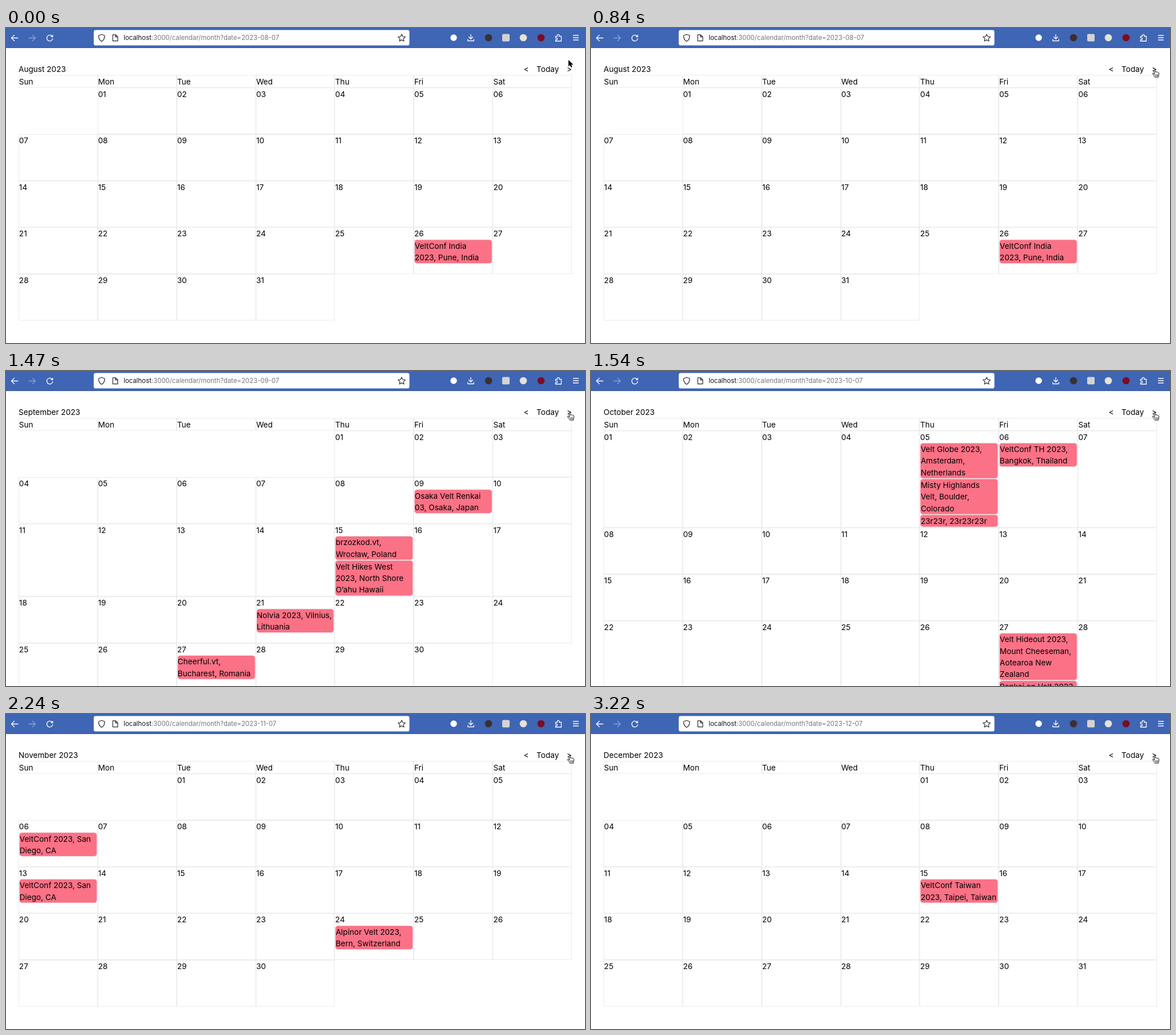
Animation, 1014 px wide and 552 px high, one loop 3570 ms. Source, as an HTML page:

```html
<!DOCTYPE html>
<html lang="en">
<head>
<meta charset="utf-8">
<title>Calendar</title>
<style>
  * { box-sizing: border-box; margin: 0; }
  html, body { width: 100%; height: 100%; overflow: hidden; background: #fff; }
  body { font-family: Inter, sans-serif; color: #000; }
  .stage { position: absolute; left: 0; top: 0; width: 1014px; height: 552px; overflow: hidden; }
  .bar, .overlay { position: absolute; left: 0; top: 0; overflow: visible; }

  .strip { position: absolute; left: 0; top: 0; width: 1014px; height: 552px; display: flex;
    animation: pages 3570ms step-end infinite; }
  .page { position: relative; flex: none; width: 1014px; height: 552px; overflow: hidden; }
  .url { position: absolute; left: 206px; top: 7px; font-size: 11.4px; line-height: 21px;
    color: #77777c; white-space: pre; }
  .url b { font-weight: 400; color: #15141a; }

  .cal { position: absolute; left: 22px; top: 62.1px; width: 1140px; font-size: 16px; line-height: 24px;
    transform: scale(.85); transform-origin: 0 0; }
  .head { display: flex; justify-content: space-between; }
  .nav { display: flex; gap: 16px; }
  .grid { display: grid; grid-template-columns: repeat(7, minmax(0, 1fr)); }
  .cell, .event { border: 1px solid #e5e7eb; }
  .day { min-height: 96px; }
  .event { border-radius: 6px; background: #fb7185; white-space: pre; }

  .cursor { animation: move 3570ms step-end infinite; }
  .arrow { animation: arrow 3570ms step-end infinite; }
  .hand { animation: hand 3570ms step-end infinite; }
  .ring { animation: click 3570ms step-end infinite; }

  @keyframes pages {
    0% { transform: translateX(0); }
    25.49% { transform: translateX(-1014px); }
    43.137% { transform: translateX(-2028px); }
    60.784% { transform: translateX(-3042px); }
    86.274% { transform: translateX(-4056px); }
  }
  @keyframes move {
    0% { transform: translate(985px, 56px); }
    1.96% { transform: translate(983px, 59px); }
    3.921% { transform: translate(980px, 64px); }
    5.882% { transform: translate(977px, 70px); }
    7.843% { transform: translate(978px, 71px); }
    9.803% { transform: translate(979px, 71.5px); }
    11.764% { transform: translate(980.2px, 71.5px); }
    15.686% { transform: translate(981.2px, 71.5px); }
    17.647%, 100% { transform: translate(982.2px, 71.5px); }
  }
  @keyframes arrow { 0% { opacity: 1; } 5.882%, 100% { opacity: 0; } }
  @keyframes hand { 0% { opacity: 0; } 5.882%, 100% { opacity: 1; } }
  @keyframes click {
    0%, 23.529%, 41.176%, 58.823%, 84.313%, 100% { opacity: 0; }
    21.568%, 37.254%, 56.862%, 82.352% { opacity: 1; }
  }
</style>
</head>
<body>
<div class="stage">
  <svg class="bar" width="1014" height="36" fill="none" stroke="#fff" stroke-width="1.3" stroke-linecap="round" stroke-linejoin="round">
    <path d="M0 0H1014V35H0Z" fill="#3f65b5" stroke="none"/>
    <path d="M0 34.6H1014" stroke="#304f91" stroke-width=".9"/>
    <rect x="153.7" y="3.4" width="552.8" height="27.2" rx="3.4" fill="#fff" stroke="none"/>
    <path d="M21 17.5H9.5M14.5 12.5L9.5 17.5L14.5 22.5"/>
    <path d="M40 17.5H51.5M46.5 12.5L51.5 17.5L46.5 22.5" opacity=".4"/>
    <path d="M80.6 14.2A5.2 5.2 0 1 0 81.8 18.6"/>
    <path d="M82.4 11.6V16H78Z" fill="#fff" stroke="none"/>
    <g stroke="#2b2a33" stroke-width="1.2">
      <path d="M167.5 11.2L172.8 13.2C172.9 18 171.5 21.3 167.5 23.5C163.5 21.3 162.1 18 162.2 13.2Z"/>
      <path d="M187 11.8H192L195.7 15.5V22.7H187ZM191.8 12V15.7H195.5"/>
      <path d="M693 11L694.9 15L699.3 15.6L696.1 18.6L696.9 23L693 20.9L689.1 23L689.9 18.6L686.7 15.6L691.1 15Z"/>
    </g>
    <path d="M814 11.3V19M810.5 15.8L814 19.3L817.5 15.8M808.8 20V22.5H819.2V20"/>
    <g stroke="none">
      <circle cx="784" cy="17" r="5.7" fill="#fff"/>
      <circle cx="845" cy="17" r="6.3" fill="#3b302e"/>
      <rect x="869" y="10.5" width="13" height="13" rx="2" fill="#d5d3d0"/>
      <circle cx="906" cy="17" r="6.3" fill="#e6e2d6"/>
      <circle cx="937" cy="17" r="6.3" fill="#7d0d20"/>
    </g>
    <path d="M962.5 14.5H965.5V13A1.7 1.7 0 0 1 968.9 13V14.5H972.5V23H962.5V20.5H964A1.6 1.6 0 0 0 964 17.3H962.5Z"/>
    <path d="M993.5 13H1002.5M993.5 17H1002.5M993.5 21H1002.5"/>
  </svg>

  <div class="strip"></div>

  <svg class="overlay" width="1014" height="552">
    <circle class="ring" cx="986.7" cy="71.5" r="25.9" fill="none" stroke="#000" stroke-width="1.3"/>
    <g class="cursor">
      <path class="arrow" d="M0 0V11.4L2.7 8.9L4.6 13.2L6.6 12.3L4.8 8.2H8.4Z" stroke="#fff" stroke-width=".8" paint-order="stroke"/>
      <g class="hand" stroke="#000" stroke-linejoin="round" stroke-linecap="round">
        <path fill="#fff" d="M3.6 2.2c0-1.9 2.2-1.9 2.3 0L6.2 6c.2-1.2 2-1.1 2.2.2c.3-1 1.9-.9 2 .4c.4-.8 1.8-.6 1.9.8C12.6 9.4 12.6 11 11.6 12.4L11.4 14.6H5.4C5 13 3 10.9 1.4 9.2C.5 8.1 1.6 7.1 2.8 8L4.3 9.4Z"/>
        <path d="M6.5 10V12.6M8.5 10V12.6M10.4 10V12.6" stroke-width=".8"/>
      </g>
    </g>
  </svg>
</div>
<script>
  const weekdays = ['Sun', 'Mon', 'Tue', 'Wed', 'Thu', 'Fri', 'Sat'];
  const sanDiego = ['VeltConf 2023, San\nDiego, CA'];
  // start: grid column of the first day
  const months = [
    { name: 'August', num: '08', start: 2, days: 31, events: {
      26: ['VeltConf India\n2023, Pune, India'] } },
    { name: 'September', num: '09', start: 5, days: 30, events: {
      9: ['Osaka Velt Renkai\n03, Osaka, Japan'],
      15: ['brzozkod.vt,\nWrocław, Poland', 'Velt Hikes West\n2023, North Shore\nO’ahu Hawaii'],
      21: ['Nolvia 2023, Vilnius,\nLithuania'],
      27: ['Cheerful.vt,\nBucharest, Romania'] } },
    { name: 'October', num: '10', start: 1, days: 31, events: {
      5: ['Velt Globe 2023,\nAmsterdam,\nNetherlands', 'Misty Highlands\nVelt, Boulder,\nColorado', '23r23r, 23r23r23r'],
      6: ['VeltConf TH 2023,\nBangkok, Thailand'],
      27: ['Velt Hideout 2023,\nMount Cheeseman,\nAotearoa New\nZealand', 'Renkai on Velt 2023,\nTokyo, Japan'] } },
    { name: 'November', num: '11', start: 3, days: 30, events: {
      6: sanDiego, 13: sanDiego,
      24: ['Alpinor Velt 2023,\nBern, Switzerland'] } },
    { name: 'December', num: '12', start: 5, days: 31, events: {
      15: ['VeltConf Taiwan\n2023, Taipei, Taiwan'] } }
  ];

  const dayCell = (month, day) => {
    const column = day === 1 ? ` style="grid-column-start:${month.start}"` : '';
    const events = (month.events[day] || []).map(e => `<div class="event">${e}</div>`).join('');
    return `<div class="cell day"${column}><div>${String(day).padStart(2, '0')}</div>${events}</div>`;
  };

  const page = month => `<div class="page">
    <div class="url"><b>localhost</b>:3000/calendar/month?date=2023-${month.num}-07</div>
    <div class="cal">
      <div class="head"><span>${month.name} 2023</span>
        <div class="nav"><span>&lt;</span><span>Today</span><span>&gt;</span></div></div>
      <div class="grid">${weekdays.map(d => `<div class="cell">${d}</div>`).join('')}${
        Array.from({ length: month.days }, (_, i) => dayCell(month, i + 1)).join('')}</div>
    </div></div>`;

  document.querySelector('.strip').innerHTML = months.map(page).join('');
</script>
</body>
</html>
```
